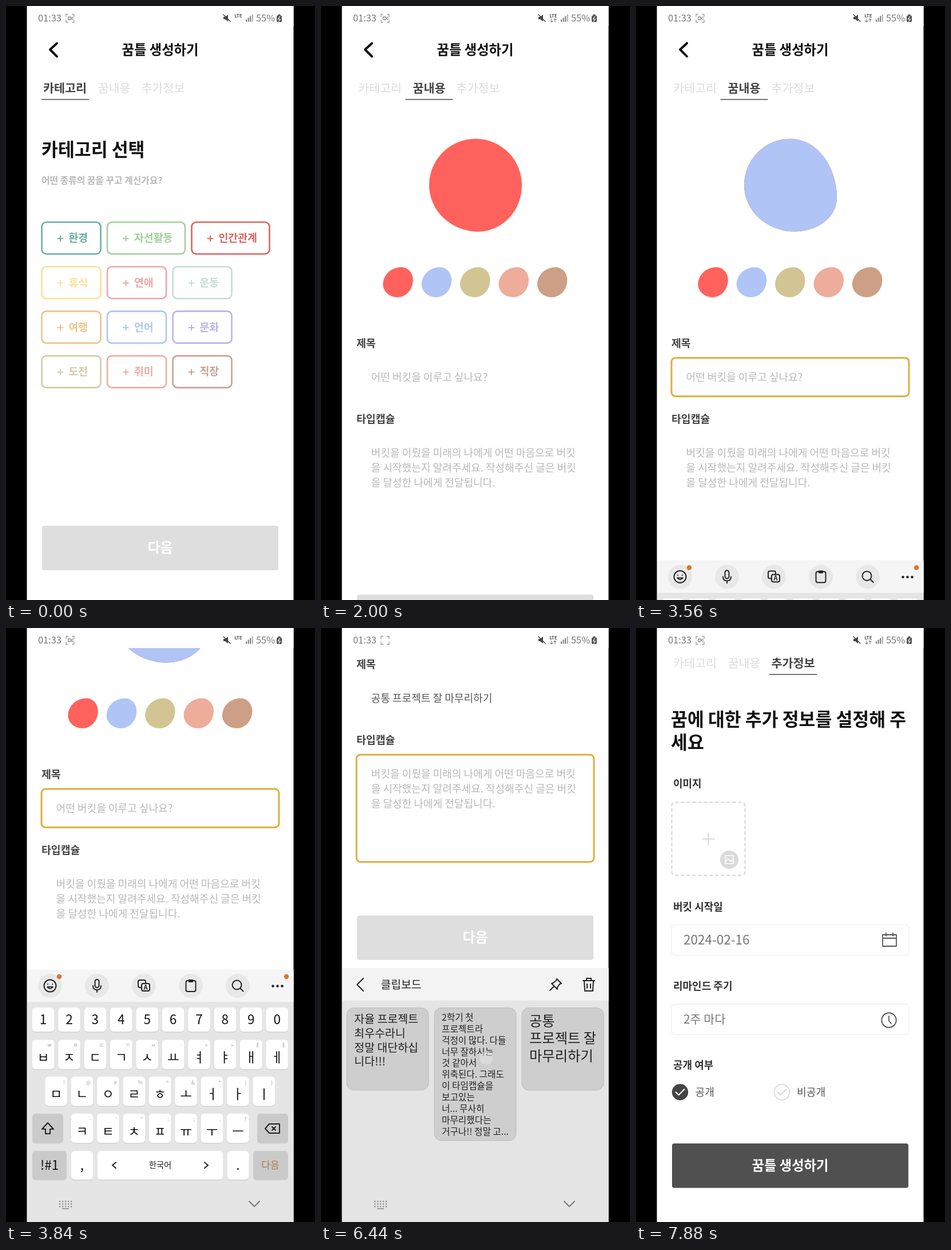
An HTML page with a canvas for the animation above (8000 ms loop, 540x1036 px).

```html
<!DOCTYPE html>
<html lang="ko">
<head>
<meta charset="utf-8">
<style>
html, body { margin: 0; width: 540px; height: 1036px; overflow: hidden; background: #000; }
canvas { display: block; filter: blur(.5px); }
</style>
</head>
<body>
<canvas id="stage" width="540" height="1036"></canvas>
<script>
const ctx = document.getElementById('stage').getContext('2d');
const FONT = '"Noto Sans CJK KR", "Noto Sans CJK", "Noto Sans", sans-serif';
const LOOP = 8000;

// Times of the screen changes and actions
const SELECT = 1150, PAGE2 = 2000, RECOLOR = 2960, FOCUS_TITLE = 3440, KEYBOARD = 3520,
  AUTOFILL = 3960, CLIPBOARD = 4200, PASTE_TITLE = 5400, FOCUS_CAPSULE = 5800,
  PASTE_CAPSULE = 6540, PAGE3 = 7000;

// start, end, x, y of each touch
const taps = [
  [1150, 1420, 407, 409], [1780, 1920, 270, 945], [2900, 3020, 202, 482],
  [3360, 3480, 270, 647], [4080, 4200, 323, 624], [5320, 5400, 440, 735],
  [5700, 5820, 270, 470], [6360, 6520, 289, 750], [6920, 7000, 270, 540]
];

const chips = [
  [['환경', '#66b0a2'], ['자선활동', '#a4cf9e'], ['인간관계', '#d9655f']],
  [['휴식', '#fbe194'], ['연애', '#eba8aa'], ['운동', '#c6dbd7']],
  [['여행', '#edc487'], ['언어', '#b4c6e8'], ['문화', '#bcb3e4']],
  [['도전', '#d3cba4'], ['취미', '#eaaea6'], ['직장', '#c6a392']]
];
const palette = ['#ff625d', '#b0c4f5', '#d2c593', '#eeac9b', '#cd9f86'];

const cards = [
  [45, 144, 19.5, 682, 24.7, ['자율 프로젝트', '최우수라니', '정말 대단하십', '니다!!!']],
  [198, 232, 15.7, 679, 19.9, ['2학기 첫', '프로젝트라', '걱정이 많다. 다들', '너무 잘하시는', '것 같아서',
    '위축된다. 그래도', '이 타임캡슐을', '보고있는', '너... 무사히', '마무리했다는', '거구나!! 정말 고...']],
  [351, 144, 24.3, 685, 30.5, ['공통', '프로젝트 잘', '마무리하기']]
];
const hint = ['버킷을 이뤘을 미래의 나에게 어떤 마음으로 버킷', '을 시작했는지 알려주세요. 작성해주신 글은 버킷',
  '을 달성한 나에게 전달됩니다.'];
const capsule = ['2학기 첫 프로젝트라 걱정이 많다. 다들 너무', '잘하시는 것 같아서 위축된다. 그래도 이 타임',
  '캡슐을 보고있는 너... 무사히 마무리했다는', '거구나!! 정말 고생했어!!'];

// Big blob over time: time, top split, bottom split, left split, right split
const blobKeys = [
  [2000, .5, .53, .5, .5], [2720, .494, .47, .51, .54], [3840, .5, .56, .5, .66],
  [5280, .5, .45, .61, .39], [6400, .494, .5, .51, .54]
];

const ease = (t, from, to) => {
  const p = Math.min(1, Math.max(0, (t - from) / (to - from)));
  return p * p * (3 - 2 * p);
};

function text(str, x, cy, size, color = '#444', weight = 400, align = 'left') {
  ctx.font = `${weight} ${size}px ${FONT}`;
  ctx.textAlign = align;
  ctx.fillStyle = color;
  ctx.fillText(str, x, cy + size * .37);
}
const label = (str, x, cy, size, color, weight) => text(str, x, cy, size, color, weight, 'center');
const lines = (list, x, cy, pitch, size, color) =>
  list.forEach((s, i) => text(s, x, cy + i * pitch, size, color));

function box(x, y, w, h, r, fill, stroke, lw = 2.6) {
  ctx.beginPath();
  ctx.roundRect(x, y, w, h, r);
  if (fill) { ctx.fillStyle = fill; ctx.fill(); }
  if (stroke) { ctx.strokeStyle = stroke; ctx.lineWidth = lw; ctx.stroke(); }
}
const disc = (x, y, r, fill, stroke, lw) => box(x - r, y - r, 2 * r, 2 * r, r, fill, stroke, lw);

// Path around (x, y), stroked, or filled when lw is 0
function icon(d, x, y, color = '#333', lw = 2) {
  ctx.save();
  ctx.translate(x, y);
  ctx.lineCap = ctx.lineJoin = 'round';
  ctx.lineWidth = lw;
  ctx.strokeStyle = ctx.fillStyle = color;
  const path = new Path2D(d);
  lw ? ctx.stroke(path) : ctx.fill(path, 'evenodd');
  ctx.restore();
}
const CHECK = 'M-7 0L-2 5L8 -5';
const plus = (x, y, r, color, lw) => icon(`M${-r} 0H${r}M0 ${-r}V${r}`, x, y, color, lw);

function faded(alpha, draw) {
  if (alpha <= 0) return;
  ctx.save();
  ctx.globalAlpha = alpha;
  draw();
  ctx.restore();
}

function blob(x, y, size, color, top, bottom, left, right) {
  const r = (h, v) => ({ x: h * size, y: v * size });
  box(x, y, size, size, [r(top, left), r(1 - top, right), r(1 - bottom, 1 - right), r(bottom, 1 - left)], color);
}

function button(y, str, dark, size = 24) {
  box(63, y, 413, 77.5, 4, '#dedede');
  faded(dark, () => box(63, y, 413, 77.5, 4, '#505050'));
  label(str, 269.5, y + 38, size, '#fff', 700);
}

function header(active) {
  icon('M6 -11L-6 0L6 12', 83, 76, '#111', 4);
  label('꿈틀 생성하기', 269.5, 76, 23.3, '#111', 700);
  ['카테고리', '꿈내용', '추가정보'].forEach((s, i) => {
    const on = i === active;
    text(s, [65, 160.5, 236.5][i], 143, 20.7, on ? '#444' : '#dcdcdc', on ? 700 : 300);
  });
  box(62 + 85.5 * active, 162, 83, 2, 0, '#777');
}

function categoryPage(t) {
  header(0);
  text('카테고리 선택', 62, 250, 31.4, '#111', 700);
  text('어떤 종류의 꿈을 꾸고 계신가요?', 62, 304, 15.8, '#b8b8b8', 700);
  chips.forEach((row, j) => {
    let x = 62.5;
    const y = 377 + 77.7 * j, mid = y + 27.5;
    row.forEach(([name, color]) => {
      const w = name.length > 2 ? 136 : 103;
      const on = name === '인간관계' && t >= SELECT;
      box(x, y, w, 55.5, 8, '#fff', color);
      if (on) {
        faded(ease(t, SELECT, SELECT + 150), () => box(x - 1, y - 1, w + 2, 57.5, 8, '#ee6d69'));
        icon(CHECK, x + 32, mid + 1, '#fff', 2.3);
      } else plus(x + 32.5, mid + 1, 4.5, color, 2);
      text(name, x + 47, mid, 18.3, on ? '#fff' : color, 700);
      x += w + 11.5;
    });
  });
  button(906.5, '다음', ease(t, SELECT, SELECT + 290));
}

function blobShape(t) {
  let i = 0;
  while (i < blobKeys.length - 2 && t > blobKeys[i + 1][0]) i++;
  const a = blobKeys[i], b = blobKeys[i + 1], p = ease(t, a[0], b[0]);
  return a.slice(1).map((v, k) => v + (b[k + 1] - v) * p);
}

function contentPage(t) {
  header(1);
  const shape = blobShape(t);
  blob(189, 231.5, 162, palette[0], ...shape);
  faded(ease(t, RECOLOR, RECOLOR + 200), () => blob(189, 231.5, 162, palette[1], ...shape));
  palette.forEach((c, i) => blob(108.3 + 67.4 * i, 455.5, 52.5, c, .62, .48, .57, .43));

  text('제목', 62, 588, 18.3, '#444', 700);
  text('타입캡슐', 62, 720, 18.3, '#444', 700);
  const titleFocus = t >= FOCUS_TITLE && t < FOCUS_CAPSULE;
  if (titleFocus) box(62, 613.7, 415, 67, 7, null, '#deae3c', 3);
  if (t >= FOCUS_CAPSULE) box(62, 746, 415, 187, 7, null, '#deae3c', 3);

  const titled = t >= PASTE_TITLE;
  text(titled ? '공통 프로젝트 잘 마무리하기' : '어떤 버킷을 이루고 싶나요?', 87.5, 647, 18.1, titled ? '#555' : '#b8b8b8');
  if (titleFocus && !titled && t > KEYBOARD + 400 && t % 1000 < 500) box(87.5, 637, 1.6, 21, 0, '#444');
  const filled = t >= PASTE_CAPSULE;
  lines(filled ? capsule : hint, 87.5, 779, 26, 18.1, filled ? '#555' : '#b8b8b8');
  button(1026.5, '다음', ease(t, PASTE_CAPSULE, PASTE_CAPSULE + 200));
}

function infoPage() {
  header(2);
  text('꿈에 대한 추가 정보를 설정해 주', 61, 241, 31.4, '#111', 700);
  text('세요', 61, 281, 31.4, '#111', 700);
  ['이미지', '버킷 시작일', '리마인드 주기', '공개 여부'].forEach((s, i) =>
    text(s, 65, [353, 568, 706, 844][i], 18, '#333', 700));

  ctx.setLineDash([6, 4]);
  box(62.5, 386, 128, 127.5, 6, null, '#dcdcdc');
  ctx.setLineDash([]);
  plus(126.5, 450, 10, '#d8d8d8', 2);
  disc(163, 486, 16, '#dadada');
  icon('M-7 -7H7V7H-7ZM-7 4L-2 -1L2 3L4 1L7 4M3 -3.5h.5', 163, 486, '#fff', 1.6);

  box(62, 599.5, 415, 53, 6, null, '#f1f1f1', 1.5);
  text('2024-02-16', 83, 626, 22.5, '#777');
  icon('M-12 -9H12V11H-12ZM-12 -3H12M-6 -12V-7M6 -12V-7', 443, 626, '#555', 1.8);
  box(62, 738, 415, 53, 6, null, '#f1f1f1', 1.5);
  text('2주 마다', 83, 764, 20.8, '#777');
  disc(442, 766, 12.7, null, '#555', 1.9);
  icon('M0 -7V1L4 6', 442, 766, '#555', 1.8);

  disc(77, 891.5, 14.2, '#444');
  icon(CHECK, 76.5, 891.5, '#fff', 2);
  text('공개', 103.5, 891.5, 18.2, '#555');
  disc(255, 891.5, 13.4, '#fff', '#dedede', 2);
  icon(CHECK, 254.5, 891.5, '#d8d8d8', 2);
  text('비공개', 281, 891.5, 18.2, '#555');
  button(981, '꿈틀 생성하기', 1, 23.3);
}

function statusBar(t) {
  const gray = '#777';
  box(37, 0, 466, 35, 0, '#fff');
  text('01:33', 56, 21, 16.4, gray);
  icon('M-7 -3V-7H-4M4 -7H7V-3M7 3V7H4M-4 7H-7V3', 112, 21.5, '#999', 1.3);
  const hidden = [560, 1560, 2560, 4000, 5040, 6080, 7120].some(s => t >= s && t < s + 440);
  if (!hidden) {
    box(108.5, 19, 5, 5, 1.5, null, '#888', 1.3);
    icon('M3 -1L5 -2V3L3 2Z', 112, 21, '#888', 1);
  }
  icon('M-6 -2H-3L2 -6V6L-3 2H-6Z', 386, 21, '#444', 0);
  icon('M-6 -6L6 6', 386, 21, '#444', 1.5);
  label('LTE', 406, 17, 8, '#555', 700);
  if (t > 800 && (t < 3700 || t > 4000)) icon('M-3 -2V4M-5 2L-3 4L-1 2M3 4V-2M1 0L3 -2L5 0', 406, 24, '#888', 1.1);
  for (let i = 0; i < 4; i++) box(419 + 3.6 * i, 23.5 - 3 * i, 2, 4 + 3 * i, 0, i < 3 ? '#777' : '#aaa');
  text('55%', 437, 21, 16.4, gray);
  box(473, 16.5, 9, 11.5, 2, '#555');
  box(475.5, 14.5, 4, 3, 1, '#555');
  icon('M1 -4L-2 1H2L-1 5', 477.5, 22, '#fff', 1.1);
}

function key(x, y, w, h, str, small, fill = '#fff') {
  box(x, y + 1.5, w, h, 6, '#d2d2d2');
  box(x, y, w, h, 6, fill);
  if (small) text(small, x + w - 4, y + 10, 9, '#aaa', 400, 'right');
  if (str) label(str, x + w / 2, y + h / 2 + (small ? 5 : 0), 22.5, '#111');
}

function keyRow(x, y, h, keys, small = '') {
  [...keys].forEach((k, i) => key(x + 45.4 * i, y, 38.5, h, k, small[i]));
}

function letterKeys() {
  box(37, 596, 466, 56, 0, '#f5f5f5');
  for (let i = 0; i < 5; i++) disc(77 + 82 * i, 624, 21, '#e8e8e8');
  disc(77, 624, 10.5, null, '#222', 2);
  icon('M-4 -3v.5M4 -3v.5M-5 2Q0 8 5 2Z', 77, 624, '#222', 1.8);
  box(155.5, 613, 7, 14, 3.5, null, '#222', 2);
  icon('M-7 0Q-7 7 0 7Q7 7 7 0M0 7V11', 159, 624, '#222', 2);
  box(231, 614, 13, 13, 3, null, '#222', 2);
  box(237, 620, 14, 13, 3, '#e8e8e8', '#222', 2);
  label('A', 244, 626.5, 11, '#222', 700);
  box(314.5, 615, 17, 19, 3, null, '#222', 2);
  box(319, 613, 8, 5, 1, '#222');
  disc(403.5, 622.5, 8, null, '#222', 2);
  icon('M6 6L11 11', 403.5, 622.5, '#222', 2.2);
  for (let i = -1; i < 2; i++) disc(474.5 + 8 * i, 624.5, 2.3, '#222');
  disc(93, 608, 4.3, '#d9762f');
  disc(490, 608, 4.3, '#d9762f');

  keyRow(45.8, 662, 42, '1234567890');
  keyRow(45.8, 718, 51.5, 'ㅂㅈㄷㄱㅅㅛㅕㅑㅐㅔ', 'ㅃㅉㄸㄲㅆ-<>ㅒㅖ');
  keyRow(68.3, 782.5, 51, 'ㅁㄴㅇㄹㅎㅗㅓㅏㅣ', '!@#%^&*()');
  keyRow(113.7, 847, 51, 'ㅋㅌㅊㅍㅠㅜㅡ', '-\'":;,?');
  const gray = '#cacaca';
  key(46, 847, 54, 51, '', '', gray);
  icon('M0 -10L10 1H4V9H-4V1H-10Z', 73, 873, '#222', 2);
  key(439, 847, 54, 51, '', '', gray);
  icon('M-13 0L-6 -8H12V8H-6ZM-1 -3L5 3M5 -3L-1 3', 466, 873, '#222', 2);
  key(46, 912, 60, 50, '!#1', '', gray);
  key(114, 912, 38, 50, ',');
  key(160, 912, 219, 50);
  label('한국어', 269.5, 937, 14.4, '#222');
  icon('M3 -5L-3 0L3 5', 189, 937, '#222', 2);
  icon('M-3 -5L3 0L-3 5', 350, 937, '#222', 2);
  key(386.5, 912, 38, 50, '.');
  key(432, 912, 61, 50, '', '', gray);
  label('다음', 462, 937, 17, '#a67d48', 500);
}

function clipboard(t) {
  box(37, 593, 466, 57, 0, '#f3f3f3');
  icon('M6 -11L-5 0L6 11', 68, 622, '#222', 2);
  text('클립보드', 104.5, 622, 19.3, '#222');
  icon('M2 -10L10 -2L7 -1L3 5L3 8L-7 -2L-4 -3L1 -7ZM-3 3L-10 10', 410, 622, '#222', 2);
  icon('M-10 -7H10M-4 -7V-11H4V-7M-8 -7L-7 11H7L8 -7M-3 -1V6M3 -1V6', 468, 622, '#222', 2);
  cards.forEach(([x, h, size, y, pitch, list], i) => {
    const pressed = i === 2 && t > 5320 && t < PASTE_TITLE;
    box(x, 662.5, 143, h - .5, 12, pressed ? '#c2c2c2' : '#cecece', '#bcbcbc', 1);
    lines(list, x + 13, y, pitch, size, '#222');
  });
}

function keyboard(t) {
  const shown = ease(t, KEYBOARD, KEYBOARD + 160) - ease(t, PAGE3, PAGE3 + 140);
  if (shown <= 0) return;
  ctx.save();
  ctx.translate(0, (1 - shown) * 444);
  if (t >= AUTOFILL && t < FOCUS_CAPSULE) {
    box(37, 526, 466, 5, 0, '#e9e9e9');
    box(37, 530.5, 466, 66, 0, '#fff');
    disc(366, 562, 6, null, '#111', 3);
    disc(366, 562, 2, '#111');
    icon('M7 -2H21V2H18V6H13V2H7', 366, 562, '#111', 2.3);
    box(413, 553, 24, 19, 2, null, '#111', 2.6);
    box(413, 557, 24, 4, 0, '#111');
    icon('M0 14Q-9 3 -9 -4A9 9 0 0 1 9 -4Q9 3 0 14ZM-3.3 -4A3.3 3.3 0 0 0 3.3 -4A3.3 3.3 0 0 0 -3.3 -4Z', 477, 562, '#111', 0);
  }
  box(37, t < CLIPBOARD ? 596 : 593, 466, 450, 0, '#e5e5e5');
  t < CLIPBOARD ? letterKeys() : clipboard(t);
  for (let i = 0; i < 15; i++) box(93 + 5 * (i % 5), 999 + 4.5 * Math.floor(i / 5), 2.2, 2.2, 0, '#888');
  box(98, 1012, 12, 1.6, 0, '#888');
  icon('M-9 -4L0 5L9 -4', 434, 1004, '#777', 2);
  ctx.restore();
}

function scrollAt(t) {
  if (t >= PAGE3) return 82;
  return 333 * ease(t, KEYBOARD + 40, KEYBOARD + 160) + 192 * ease(t, FOCUS_CAPSULE + 40, FOCUS_CAPSULE + 200);
}

function render(now) {
  const t = now % LOOP;
  ctx.fillStyle = '#000';
  ctx.fillRect(0, 0, 540, 1036);
  ctx.save();
  ctx.beginPath();
  ctx.rect(36.5, 0, 466, 1036);
  ctx.clip();
  ctx.fillStyle = '#fff';
  ctx.fillRect(36, 0, 468, 1036);

  ctx.save();
  ctx.translate(0, -scrollAt(t));
  if (t < PAGE2) categoryPage(t);
  else if (t < PAGE3) contentPage(t);
  else infoPage();
  ctx.restore();

  keyboard(t);
  statusBar(t);
  for (const [from, to, x, y] of taps)
    if (t >= from && t < to) disc(x, y, 11.5, 'rgba(232,232,232,.5)');
  ctx.restore();
  requestAnimationFrame(render);
}
requestAnimationFrame(render);
</script>
</body>
</html>
```
